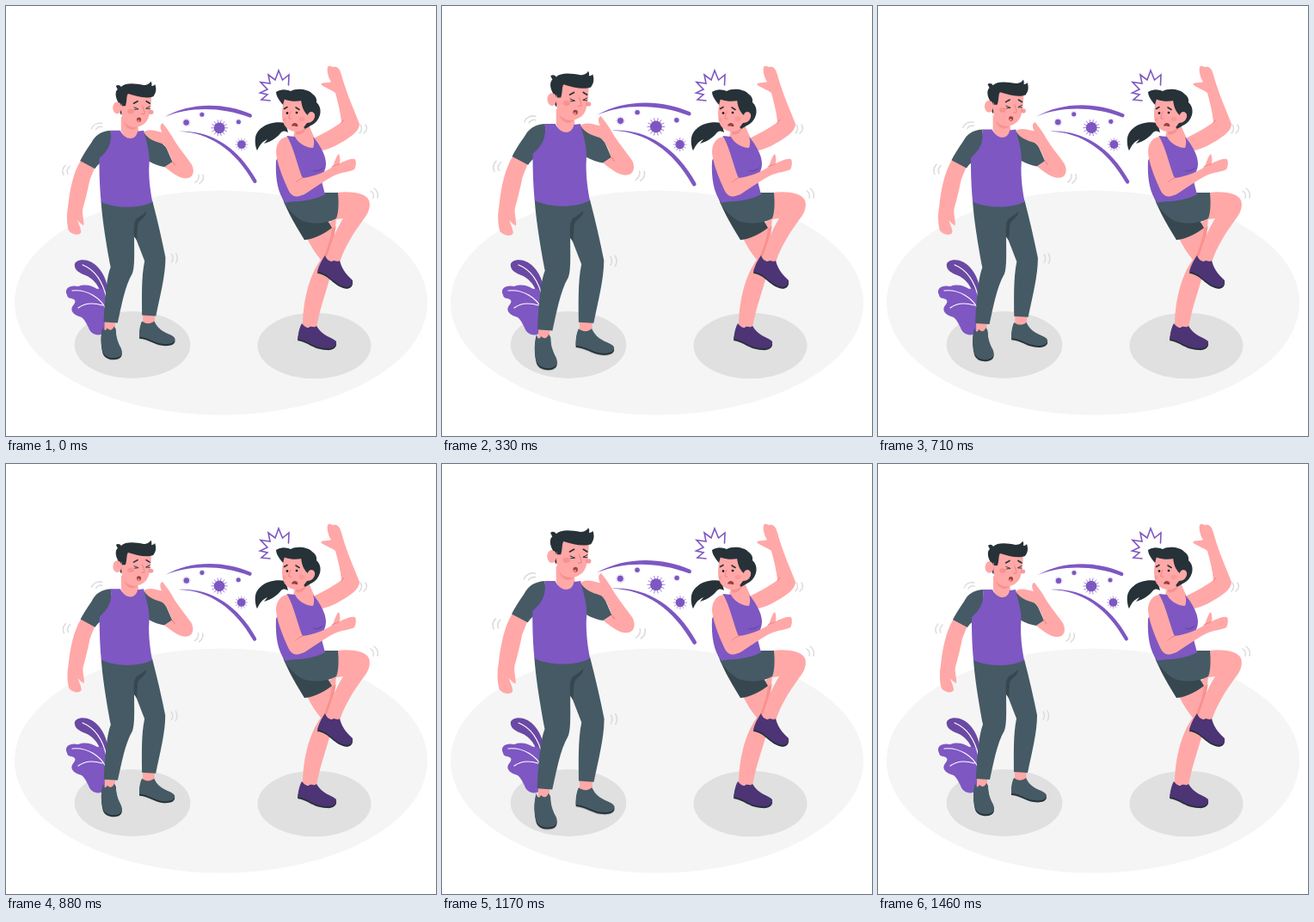
Write an HTML page that moves like this. It is 500 by 500 pixels and loops after 1500 ms.

```html
<!DOCTYPE html>
<html lang="en">
<head>
<meta charset="utf-8">
<title>Keep your distance</title>
<style>
  html, body { margin: 0; height: 100%; overflow: hidden; background: #fff; }
  svg { display: block; width: 100vw; height: 100vh; }
  .purple { fill: #7e57c2; }
  .plum { fill: #4d3475; }
  .skin { fill: #ffa8a7; }
  .blush { fill: #f28482; }
  .grey { fill: #455a64; }
  .slate { fill: #37474f; }
  .dark { fill: #263238; }
  .shoe { filter: drop-shadow(0 2px 0 #263238); }
  .line { fill: none; stroke-linecap: round; stroke-linejoin: round; }
  .shake { stroke: #dcdcdc; stroke-width: 1.5; }
  .vein { stroke: #fff; stroke-width: 1.2; }
  .ink { stroke: #263238; stroke-width: .9; }
  .brow { stroke: #263238; stroke-width: 1.6; }
  .crease { stroke: #eb8382; stroke-width: 1; }
  .burst { stroke: #7e57c2; stroke-width: 1.6; stroke-linejoin: miter; }
</style>
</head>
<body>
<svg viewBox="0 0 500 500">
  <ellipse cx="250" cy="345" rx="240" ry="130.5" fill="#f5f5f5"/>
  <g fill="#e0e0e0">
    <ellipse cx="147" cy="394" rx="67.3" ry="39"/>
    <ellipse cx="358.5" cy="395" rx="66" ry="38.3"/>
  </g>

  <g id="plant">
    <path fill="#6a49a4" d="M80 303C78 296 88 294 95 296C108 300 118 316 119 334L112 336C106 322 100 316 92 313C85 310 81 308 80 303Z"/>
    <path class="purple" d="M71 336C67 328 75 324 84 326C92 323 100 325 106 329C113 326 118 335 118 346L116 378C108 387 98 381 96 374C92 366 90 362 85 361C76 358 74 352 79 347C82 343 80 341 76 340C73 340 71 338 71 336Z"/>
    <path class="line vein" d="M89 301C104 307 113 322 117 340M77 331C95 329 110 340 116 352M84 351C92 345 102 345 112 348"/>
  </g>

  <g id="woman">
    <path class="dark" d="M325 136C308 133 292 141 290 153C289 160 291 166 292 168C296 160 298 158 304 155L300 160C310 157 316 152 320 147C322 145 325 145 328 147Z"/>
    <path class="skin" d="M357 154C372 147 384 140 390 135C389 124 386 112 383 101C378 97 370 95 366 91C369 88 374 90 378 88C374 82 373 74 374 71C376 68 380 71 380 71C384 69 388 73 389 77C391 82 392 88 394 93C398 106 406 124 411 137C411 144 404 150 396 155C388 160 378 166 368 168Z"/>
    <path class="line crease" d="M390 136L393 132"/>
    <path class="skin" d="M350 270L384 246L381 280L380 300C376 325 366 345 361 374L345 373C345 345 352 314 366 295C360 288 355 280 350 270Z"/>
    <path class="slate" d="M321 222C328 242 340 260 347 272C358 271 370 265 379 258L372 246Z"/>
    <path class="skin" d="M384 217C400 215 418 217 422 226C425 234 420 243 415 249C404 264 394 280 388 298L371 293C378 275 383 262 392 247L384 248Z"/>
    <path class="blush" opacity=".65" d="M379 259L384 256C381 268 377 280 373 291L370 291C374 280 378 270 379 259Z"/>
    <path class="plum shoe" d="M371 290C366 297 363 304 362 309C375 310 380 323 394 326.500C399 328 404 324 403 319C398 314 391 308 388 296C385 299 382 294 379 297C376 297 373 295 371 290Z"/>
    <path class="plum shoe" d="M344 369C340 376 340 383 339 387C352 389 356 397 372 398C380 399 385 395 384 390C379 385 368 384 361 372C358 375 355 371 352 374C349 374 346 372 344 369Z"/>
    <path class="grey" d="M326 220C340 227 358 224 371 217L386 217C387 228 387 240 384 247C372 254 352 254 343 249C334 243 323 232 323 226Z"/>
    <path class="skin" d="M337 138L334 153L345 167L360 168L358 152L351 136Z"/>
    <path class="blush" opacity=".6" d="M337 145C342 147 347 144 350 139C348 147 343 151 337 149Z"/>
    <path class="purple" d="M327 151L336 152C341 162 352 165 357 165C359 160 358 155 357 152C364 160 372 173 372 183C372 190 369 195 366 200L371 219C352 229 334 226 325 229C316 218 313 200 314 180Z"/>
    <path fill="#6a49a4" d="M354 191C361 192 367 190 371 186C367 192 361 194 354 191Z"/>
    <path class="dark" d="M314 100C320 96 326 97 331 99C338 95 352 97 356 102C362 106 361 110 361 112C368 118 367 130 358 137C353 140 349 142 348 143L326 120C322 114 314 107 314 100Z"/>
    <path class="skin" d="M324 108C320 120 320 132 324 139C329 146 338 148 344 144L350 136C356 136 360 131 359 126C357 121 352 123 351 126C347 124 344 118 343 109Z"/>
    <path class="dark" d="M317 104C322 110 334 112 344 110C344 118 348 125 351 127L354 110L335 101Z"/>
    <g class="blush" opacity=".35"><ellipse cx="344" cy="131.500" rx="3.600" ry="2.700"/><ellipse cx="323.500" cy="132" rx="2" ry="2.500"/></g>
    <circle cx="327" cy="124.500" r="1.300"/><circle cx="338" cy="124" r="1.300"/>
    <path class="line brow" d="M323.500 119.500L327 117.500M337 118L341 120.500"/>
    <path class="line crease" d="M331 123C330 127 328 130 329 131L332 131"/>
    <path fill="#96403f" d="M332 139.500C332.500 136 336 135 338.500 137C340 140 339.500 140.500 337.500 140C336 139 334 139.500 332 139.500Z"/>
    <path class="skin" d="M327 152C319 153 314 160 314 170C315 185 325 207 330 217C335 224 342 221 347 219C358 212 372 202 382 197C390 193 400 193 405 190C408 186 407 177 405 178C400 177 393 181 388 183C389 178 388 174 387 172C383 176 382 182 380 187C370 194 355 199 345 200C340 190 335 165 327 152Z"/>
    <path class="line crease" d="M345 200C342 201 339 203 337 205M379 187C382 185 385 185 387 184"/>
    <path class="line burst" d="M307 110L297 109L304 103L295.500 101L304 97L296 88.500L307 90L305 80L313 86L317 75L321.500 86L329 80L328.500 92"/>
    <path class="line shake" d="M411 148C414 145 414 141 412 138M416 148C420 145 420 141 418 138M424 215C427 217 428 220 427 223M428 212C432 215 433 219 432 223"/>
  </g>

  <g id="man">
    <path class="skin" d="M88 180C79 194 75 215 73 234C71 245 72 255 74 261C78 266 86 267 88 263C88 258 86 256 84 249C86 252 89 254 91 255C92 250 89 243 90 236C93 226 96 213 98 203L104 188ZM115 364H127V378H115ZM159 356H172.500V370H159Z"/>
    <path class="grey shoe" d="M113 371C110 382 111 392 113 400C115 406 122 408 128 407C135 406 136 401 134 396C131 390 128 384 128 374L126 371C124 376 121 376 118 373C116 377 114 376 113 371Z"/>
    <path class="grey shoe" d="M158 365C155 371 155 378 155 383C166 384 172 390 181 391C188 392 195 391 196 386C196 381 187 380 180 375C176 372 174 369 172 365C167 369 162 368 158 365Z"/>
    <path class="grey" d="M111 227C112 245 117 277 122 303C117 315 115 345 114 366L130 367C134 350 138 325 147 310C150 302 149 285 149 265L161 296C157 315 158 340 158 358L174 359C179 335 185 312 185 292C181 272 176 250 170 227Z"/>
    <path class="slate" d="M149 268C148 258 149 250 152 247C156 245 160 242 163 239C163 247 154 248 153 255L152 272Z"/>
    <path class="grey" d="M122 146C110 147 104 152 100 160C95 167 90 175 87 181L104 190C107 185 112 182 116 178C124 168 123 155 122 146ZM158 147C170 152 182 160 186 166L193 182L184 188C178 187 172 185 165 181Z"/>
    <path class="skin" d="M134 130V146C138 159 152 158 154 147L153 138Z"/>
    <path class="blush" opacity=".6" d="M137 136C142 142 148 143 153 142C148 148 140 145 137 136Z"/>
    <path class="purple" d="M122 146L133 146C139 158 151 158 153 147L160 146C163 160 168 170 166 190C166 205 168 218 170 228C155 236 128 236 111 228C109 205 109 190 109 178C118 170 124 162 122 146Z"/>
    <path class="dark" d="M134 128C130 121 130 115 131 112L142 104V120Z"/>
    <ellipse class="skin" cx="129.500" cy="120" rx="5" ry="6.800"/>
    <path class="skin" d="M135 104C134 118 133 130 138 136C143 142 152 144 158 140C166 136 168 128 169 104Z"/>
    <path class="dark" d="M131 114C127 108 127 101 130 99L128 95C130 93 133 94 134 96C139 91 150 92 160 94C165 94 168 91 168 89.500C170 92 169 94 169 95C172 95 173 93 173 93C175 99 174 103 171 107C163 110 152 107 142 104C140 106 141 112 139 118L135 118C135 114 133 113 131 114Z"/>
    <g class="blush"><ellipse cx="145" cy="124" rx="3.800" ry="2.800" opacity=".6"/><ellipse cx="168.500" cy="125" rx="2.700" ry="2.500" opacity=".8"/></g>
    <path class="line brow" d="M148.500 115L153 112.500M163 112.500L167 115"/>
    <path class="line ink" d="M149 119.500L154 121.500L149.500 122M167 118.500L162.500 120.800L167 121.200"/>
    <path class="line crease" d="M158.500 118C160 123 162 126 160.500 127L157.500 127"/>
    <ellipse cx="154.500" cy="133.800" rx="2.500" ry="2.700" fill="#96403f"/>
    <ellipse class="blush" cx="154" cy="135" rx="1.500" ry="1.200"/>
    <path class="skin" d="M160 148C166 143 174 147 181 148C178 143 179 138 182 138C185 142 189 147 192 152C199 165 209 176 215 185C219 193 217 201 208 201C200 201 192 194 184 188L193 182C191 175 187 167 183 162C176 159 166 158 160 148Z"/>
    <path class="line crease" d="M193 182L196 186"/>
    <path class="line shake" d="M100 144C102 139 107 137 112 138M105 145C106 143 109 141 112 142M70 186C67 189 66 193 68 197M75 187C72 190 71 193 73 196M219 206C222 204 224 200 223 197M224 207C228 204 229 200 228 197M192 288C194 291 194 295 192 297M197 287C199 291 199 295 197 298"/>
  </g>

  <g id="cough" class="purple">
    <path d="M185 129.500C213 113 252 112 284 126A2 2 0 0 1 282.500 130C252 118 214 117 185 129.500Z"/>
    <path d="M201 146C236 144 269 163 290.500 202A2 2 0 0 1 287 204.500C266 167 236 147 201 146Z"/>
  </g>
</svg>
<script>
const man = document.getElementById('man');
const cough = document.getElementById('cough');

// A germ is a disc with short thin spikes.
function addGerm(x, y, radius, reach, spikes) {
  let d = '';
  for (let i = 0; i < spikes; i++) {
    const a = i * 2 * Math.PI / spikes;
    d += `M${x} ${y}L${x + reach * Math.cos(a)} ${y + reach * Math.sin(a)}`;
  }
  cough.insertAdjacentHTML('beforeend',
    `<circle cx="${x}" cy="${y}" r="${radius}"/>
     <path class="line" d="${d}" stroke="#7e57c2" stroke-width="${reach / 13}"/>`);
}
addGerm(248, 142, 6.3, 9.2, 14);
addGerm(273.5, 161, 4.8, 7, 12);
addGerm(210, 135.7, 3.2, 4.5, 12);
addGerm(228, 126.6, 2.5, 3.3, 10);
addGerm(270, 135, 2.5, 3.3, 10);

// Two linear beats per loop: quick up, slow down, quick up, quick down.
function beat(p) {
  if (p < .2) return p / .2;
  if (p < .6) return (.6 - p) / .4;
  return 1 - Math.abs(p - .8) / .2;
}

function scaleAbout(node, x, y, s) {
  node.setAttribute('transform', `translate(${x} ${y}) scale(${s}) translate(${-x} ${-y})`);
}

const start = performance.now();
function draw() {
  const t = performance.now() - start;
  const s = 1 + .1 * beat((t + 38) % 1500 / 1500);
  scaleAbout(man, 148, 249, s);
  scaleAbout(cough, 238, 160, s);
  requestAnimationFrame(draw);
}
draw();
</script>
</body>
</html>
```
